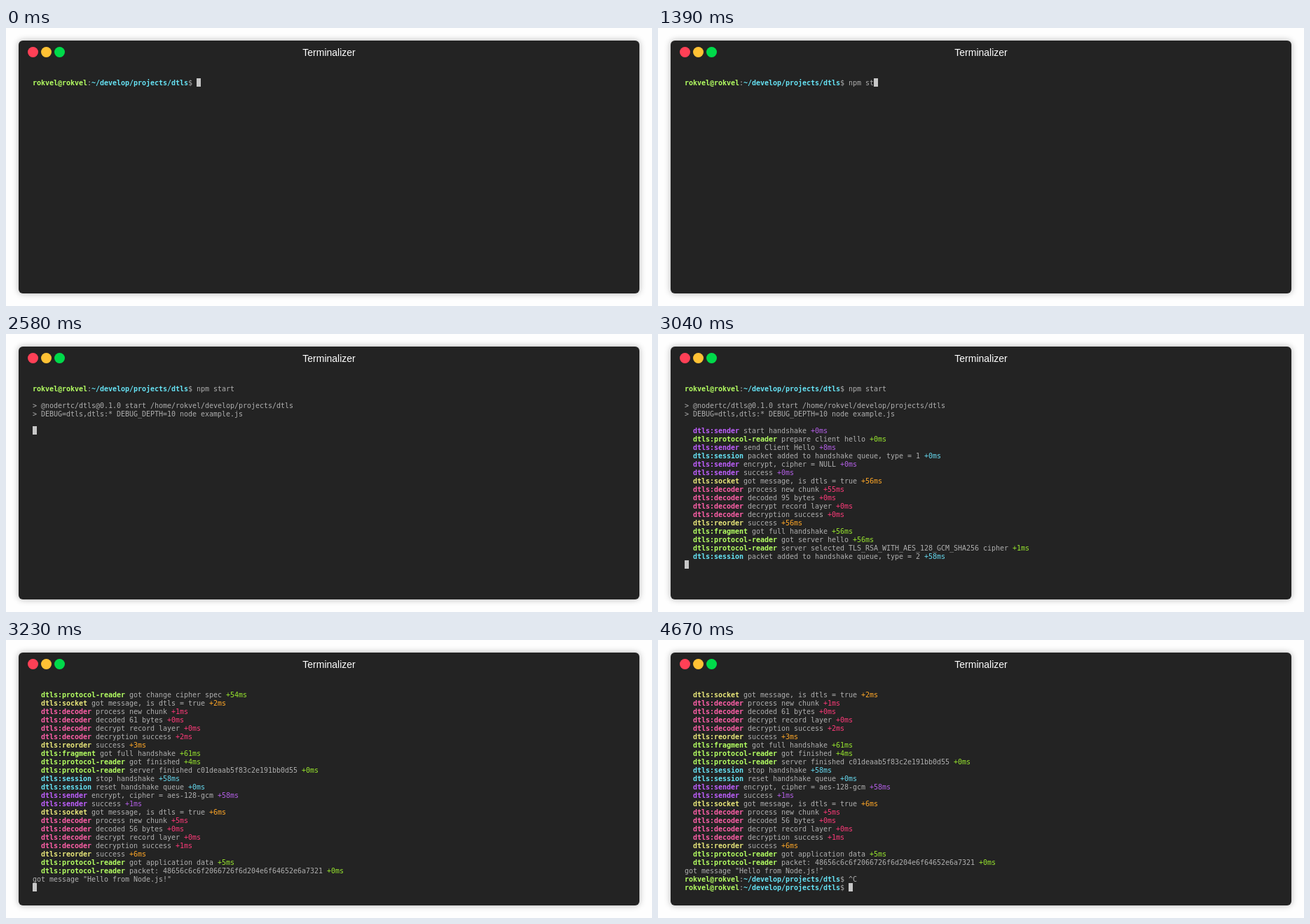
Recreate the animation shown at these times as an HTML page. Size 922 by 398 pixels, loop 4.77 s.

```html
<!DOCTYPE html>
<html lang="en">
<head>
<meta charset="utf-8">
<title>Terminal session</title>
<style>
  html, body { margin: 0; width: 100%; height: 100%; overflow: hidden; background: #fefefe; }
  #window {
    position: absolute; left: 18px; top: 18px; width: 886px; height: 362px;
    border-radius: 6px; background: #232323; box-shadow: 0 0 10px rgba(0, 0, 0, .3);
  }
  #title {
    position: absolute; top: 9px; width: 100%; text-align: center;
    font: 14px/16px "Liberation Sans", Arial, sans-serif; color: #fff;
  }
  .dot { position: absolute; top: 9px; width: 15px; height: 15px; border-radius: 50%; }
  #screen {
    position: absolute; left: 20px; top: 55px; margin: 0; color: #afafaf;
    font: 10px/12px "DejaVu Sans Mono", monospace; letter-spacing: -.0205px;
  }
  #screen div { height: 12px; white-space: pre; }
  #cursor {
    display: inline-block; position: relative; top: -1px; width: 6px; height: 12px;
    vertical-align: top; background: #c7c7c7;
  }
</style>
</head>
<body>
<div id="window">
  <div class="dot" style="left:13px;background:#ff4056"></div>
  <div class="dot" style="left:32px;background:#ffc234"></div>
  <div class="dot" style="left:51px;background:#00da4a"></div>
  <div id="title">Terminalizer</div>
  <div id="screen"></div>
</div>
<script>
const LOOP = 4770, ROWS = 24;
const USER = 'rokvel', PATH = '~/develop/projects/dtls';
const PROMPT = `${USER}@${USER}:${PATH}$ `;

// label colour, elapsed time colour
const green = ['#b4ff62', '#98e62e'], yellow = ['#e9e77a', '#ffa727'];
const COLORS = {
  'protocol-reader': green, fragment: green, socket: yellow, reorder: yellow,
  sender: ['#bf5fff', '#b45fe8'], session: ['#66e3f5', '#66d9ef'], decoder: ['#ff5fa8', '#fc3a78'],
};

const log = (name, text, ms) => `  dtls:${name} ${text} +${ms}ms\n`;
const reader = (text, ms) => log('protocol-reader', text, ms);
const sender = (text, ms) => log('sender', text, ms);
const session = (text, ms) => log('session', text, ms);
const queued = (type, ms) => session(`packet added to handshake queue, type = ${type}`, ms);
const encrypted = (cipher, ms, done) => sender(`encrypt, cipher = ${cipher}`, ms) + sender('success', done);
const decoded = (bytes, chunk, done, reorder) =>
  log('decoder', 'process new chunk', chunk) +
  log('decoder', `decoded ${bytes} bytes`, 0) +
  log('decoder', 'decrypt record layer', 0) +
  log('decoder', 'decryption success', done) +
  log('reorder', 'success', reorder);
const received = (ms, ...packet) => log('socket', 'got message, is dtls = true', ms) + decoded(...packet);
const fragment = ms => log('fragment', 'got full handshake', ms);

const keyTimes = [260, 540, 650, 750, 860, 1390, 1510, 1610, 1710];
const output = [
  [0, PROMPT],
  ...keyTimes.map((time, i) => [time, 'npm start'[i]]),
  [1890, '\n'],
  [2580, `\n> @nodertc/dtls@0.1.0 start /home/${USER}/develop/projects/dtls\n` +
    '> DEBUG=dtls,dtls:* DEBUG_DEPTH=10 node example.js\n\n'],
  [2820, sender('start handshake', 0) + reader('prepare client hello', 0) +
    sender('send Client Hello', 8) + queued(1, 0) + encrypted('NULL', 0, 0)],
  [3040, received(56, 95, 55, 0, 56) + fragment(56) + reader('got server hello', 56) +
    reader('server selected TLS_RSA_WITH_AES_128_GCM_SHA256 cipher', 1) + queued(2, 58)],
  [3140, received(5, 860, 5, 0, 4) + fragment(5) + reader('got server certificate', 3)],
  [3190, queued(11, 5) + received(4, 25, 5, 0, 5) + fragment(4) +
    reader('got server hello done', 4) + queued(14, 4) + reader('prepare client key exchange', 1) +
    sender('send Client Key Exchange', 68) + queued(16, 3) + encrypted('NULL', 1, 0) +
    sender('send Change Cipher Spec', 0) + encrypted('NULL', 0, 0) +
    sender('send Finished', 1) + queued(20, 2) + encrypted('aes-128-gcm', 0, 1)],
  [3230, reader('got change cipher spec', 54) + received(2, 61, 1, 2, 3) + fragment(61) +
    reader('got finished', 4) + reader('server finished c01deaab5f83c2e191bb0d55', 0) +
    session('stop handshake', 58) + session('reset handshake queue', 0) +
    encrypted('aes-128-gcm', 58, 1) + received(6, 56, 5, 1, 6) +
    reader('got application data', 5) +
    reader('packet: 48656c6c6f2066726f6d204e6f64652e6a7321', 0) +
    'got message "Hello from Node.js!"\n'],
  [3280, PROMPT],
  [3320, '^C\n'],
  [4670, PROMPT],
];

const paint = (text, color, weight = 'bold') =>
  `<span style="color:${color};font-weight:${weight}">${text}</span>`;

function formatLine(line) {
  const entry = line.match(/^  (dtls:(\S+)) (.*) (\+\d+ms)$/);
  if (entry) {
    const [, label, name, text, elapsed] = entry;
    const [bright, plain] = COLORS[name];
    return `  ${paint(label, bright)} ${text} ${paint(elapsed, plain, 'normal')}`;
  }
  if (line.startsWith(PROMPT)) {
    return `${paint(`${USER}@${USER}`, green[0])}:${paint(PATH, COLORS.session[0])}$ ` +
      line.slice(PROMPT.length);
  }
  return line.replace(/>/g, '&gt;');
}

const screenEl = document.getElementById('screen');
let shown = 0;

function draw(now) {
  const time = now % LOOP;
  const visible = output.filter(([start]) => start <= time);
  if (visible.length !== shown) {
    shown = visible.length;
    const lines = visible.map(([, text]) => text).join('').split('\n').slice(-ROWS);
    screenEl.innerHTML = lines.map((line, i) =>
      `<div>${formatLine(line)}${i === lines.length - 1 ? '<span id="cursor"></span>' : ''}</div>`).join('');
  }
  requestAnimationFrame(() => draw(performance.now() - origin));
}

const origin = performance.now();
draw(0);
</script>
</body>
</html>
```
